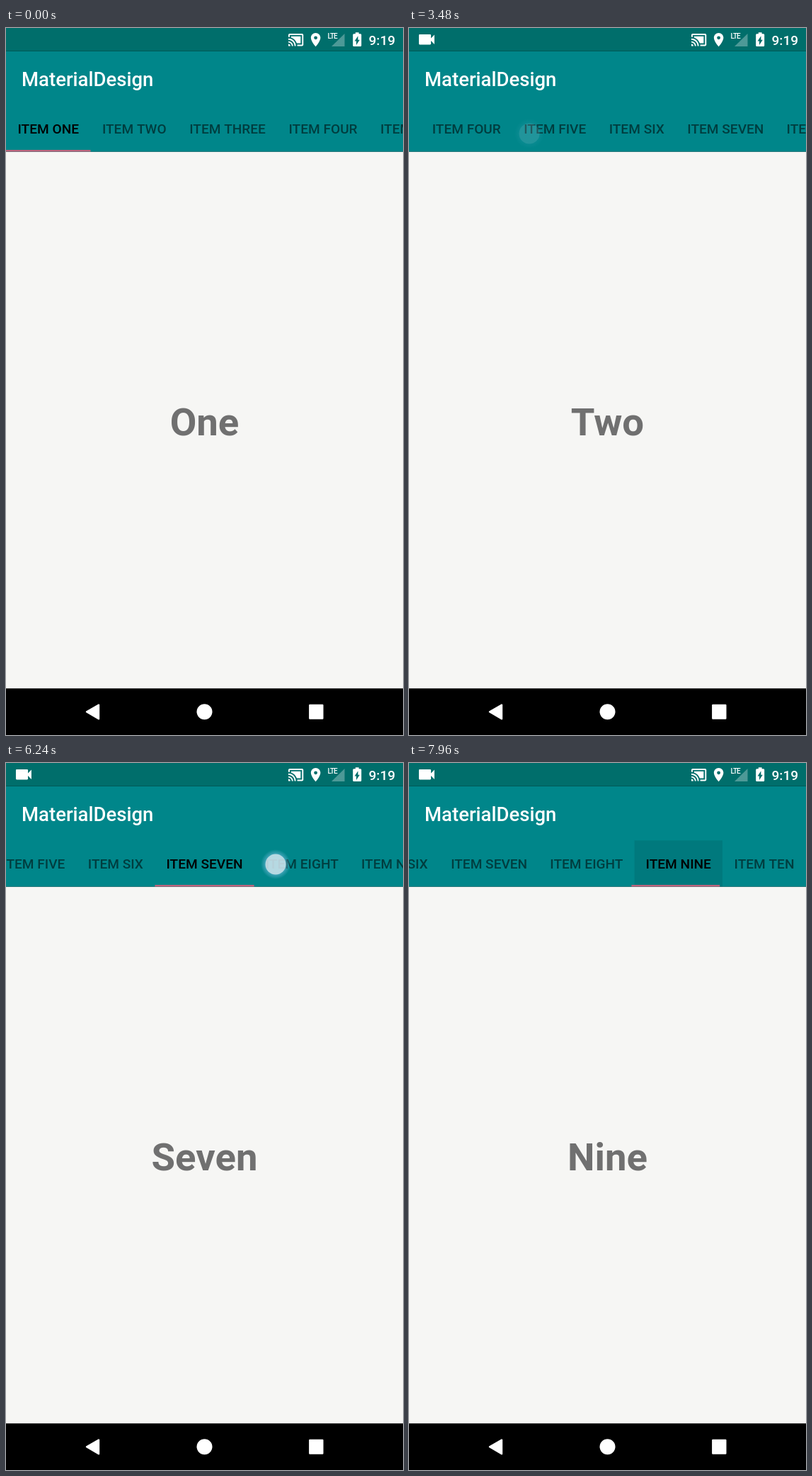
These frames come from a looping animation (561 px wide and 998 px high, 8 s). An HTML page with a canvas:

```html
<!DOCTYPE html>
<html lang="en">
<head>
<meta charset="utf-8">
<title>Scrolling tabs</title>
<style>
  html, body { margin: 0; width: 100%; height: 100%; overflow: hidden; background: #000; }
  canvas { display: block; width: 561px; height: 998px; }
</style>
</head>
<body>
<canvas id="stage"></canvas>
<script>
const W = 561, H = 998, LOOP = 8000, STEP = 40;
const BAR = { status: 32.7, tabs: 109.2, page: 174.6, nav: 932.5 };
const TEAL = '#00868a';
const FONT = 'Roboto, sans-serif';

const names = ['One', 'Two', 'Three', 'Four', 'Five', 'Six', 'Seven', 'Eight', 'Nine', 'Ten'];
// Left edge of every tab, plus the end of the strip
const edges = [0, 119.5, 243, 383, 513, 633, 744, 884.3, 1019.5, 1144, 1262];
const maxScroll = edges[10] - W;

const taps = [
  { from: 0, to: 1, down: 1310, up: 1550, x: 184, y: 143 },
  { from: 1, to: 6, down: 4550, up: 4677.2, x: 330, y: 115 },
  { from: 6, to: 7, down: 6230, up: 6380, x: 381, y: 143 },
  { from: 7, to: 8, down: 7550, up: 7726, x: 385, y: 143.5 }
];
const flick = { down: 3150, up: 3310, x0: 411, x: 170, y: 149, drag: 230, fling: 242, time: 600 };
const FRAME_LAG = 17;

const icons = {
  cast: new Path2D('M1 18v3h3c0-1.66-1.34-3-3-3zm0-4v2c2.76 0 5 2.24 5 5h2c0-3.87-3.13-7-7-7zm18-7H5v1.63c3.96 1.28 7.09 4.41 8.37 8.37H19V7zM1 10v2c4.97 0 9 4.03 9 9h2c0-6.08-4.93-11-11-11zm20-7H3c-1.1 0-2 .9-2 2v3h2V5h18v14h-7v2h7c1.1 0 2-.9 2-2V5c0-1.1-.9-2-2-2z'),
  pin: new Path2D('M12 2C8.13 2 5 5.13 5 9c0 5.25 7 13 7 13s7-7.75 7-13c0-3.87-3.13-7-7-7zm0 9.5a2.5 2.5 0 0 1 0-5 2.5 2.5 0 0 1 0 5z'),
  battery: new Path2D('M15.67 4H14V2h-4v2H8.33C7.6 4 7 4.6 7 5.33v15.33C7 21.4 7.6 22 8.33 22h7.33c.74 0 1.34-.6 1.34-1.33V5.33C17 4.6 16.4 4 15.67 4zM11 20v-5.5H9L13 7v5.5h2L11 20z'),
  camera: new Path2D('M17 10.5V7c0-.55-.45-1-1-1H4c-.55 0-1 .45-1 1v10c0 .55.45 1 1 1h12c.55 0 1-.45 1-1v-3.5l4 4v-11l-4 4z')
};

const canvas = document.getElementById('stage');
const ctx = canvas.getContext('2d');
const ratio = window.devicePixelRatio || 1;
canvas.width = W * ratio;
canvas.height = H * ratio;

const clamp = (v, lo = 0, hi = 1) => Math.min(hi, Math.max(lo, v));
const mix = (a, b, p) => a + (b - a) * p;
const quintOut = u => 1 - Math.pow(1 - u, 5);

// cubic-bezier(.4, 0, .2, 1)
function fastOutSlowIn(x) {
  let lo = 0, hi = 1, s = x;
  for (let i = 0; i < 24; i++) {
    s = (lo + hi) / 2;
    const bx = 1.2 * (1 - s) * (1 - s) * s + 0.6 * (1 - s) * s * s + s * s * s;
    if (bx < x) lo = s; else hi = s;
  }
  return x >= 1 ? 1 : 3 * (1 - s) * s * s + s * s * s;
}

const lastTap = t => taps.filter(tap => tap.up <= t).pop();

function pageAt(t) {
  const tap = lastTap(t);
  if (!tap) return 0;
  const time = Math.min(600, (tap.to - tap.from + 1) * 100);
  return mix(tap.from, tap.to, quintOut(clamp((t - tap.up) / time)));
}

function scrollAt(t) {
  const late = t - FRAME_LAG;
  if (t > flick.down && late < taps[1].up) {
    const drag = flick.drag * clamp((t - flick.down) / (flick.up - flick.down));
    const u = clamp((t - flick.up) / flick.time);
    return drag + flick.fling * (1 - Math.pow(1 - u, 2.5));
  }
  const page = pageAt(late), i = Math.floor(page);
  const center = k => (edges[k] + edges[k + 1]) / 2;
  return clamp(mix(center(i), center(i + 1), page - i) - W / 2, 0, maxScroll);
}

function indicatorAt(t) {
  const tap = lastTap(t);
  if (!tap) return [edges[0], edges[1]];
  const left = edges[tap.to], right = edges[tap.to + 1];
  const near = tap.to - tap.from === 1;
  const start = near ? [edges[tap.from], edges[tap.from + 1]] : [left - 32.7, left - 32.7];
  const p = fastOutSlowIn(clamp((t - tap.up) / 300));
  return [mix(start[0], left, p), mix(start[1], right, p)];
}

function rect(x, y, w, h, color) {
  ctx.fillStyle = color;
  ctx.fillRect(x, y, w, h);
}

function circle(x, y, r, color) {
  ctx.fillStyle = color;
  ctx.beginPath();
  ctx.arc(x, y, r, 0, Math.PI * 2);
  ctx.fill();
}

function text(str, x, y, size, weight, color, align = 'left') {
  ctx.font = `${weight} ${size}px ${FONT}`;
  ctx.textAlign = align;
  ctx.fillStyle = color;
  ctx.fillText(str, x, y);
}

function icon(path, x, y, sx, sy = sx, alpha = 1) {
  ctx.save();
  ctx.translate(x, y);
  ctx.scale(sx, sy);
  ctx.fillStyle = `rgba(255,255,255,${alpha})`;
  ctx.fill(path, 'evenodd');
  ctx.restore();
}

function polygon(points, color, round = 0) {
  ctx.beginPath();
  points.forEach(([x, y]) => ctx.lineTo(x, y));
  ctx.closePath();
  ctx.fillStyle = ctx.strokeStyle = color;
  ctx.fill();
  if (round) {
    ctx.lineWidth = round;
    ctx.lineJoin = 'round';
    ctx.stroke();
  }
}

function drawStatus(t) {
  rect(0, 0, W, BAR.status, '#006e6b');
  icon(icons.camera, 10.3, 1.6, 1.22, 1.22, clamp((t - 80) / 160));
  icon(icons.cast, 398, 5.1, 0.967);
  icon(icons.pin, 426, 5.1, 0.967);
  polygon([[478.5, 8], [478.5, 26], [460, 26]], 'rgba(255,255,255,.3)');
  ctx.letterSpacing = '-1px';
  text('LTE', 454.5, 15.2, 10, '500 condensed', '#fff');
  ctx.letterSpacing = '0px';
  icon(icons.battery, 481.8, 4.4, 1.2, 0.98);
  text('9:19', 512.5, 23.7, 19.1, 500, '#fff');
}

function drawRipple(t, scroll) {
  const tap = lastTap(t);
  if (!tap) return;
  const age = t - tap.up;
  const alpha = 0.1 * (1 - clamp((age - 220) / 380));
  if (alpha <= 0) return;
  const left = edges[tap.to] - scroll, width = edges[tap.to + 1] - edges[tap.to];
  ctx.save();
  ctx.beginPath();
  ctx.rect(left, BAR.tabs, width, BAR.page - BAR.tabs);
  ctx.clip();
  circle(clamp(tap.x, left, left + width), tap.y, mix(20, 165, clamp(age / 200)), `rgba(0,0,0,${alpha})`);
  ctx.restore();
}

function drawTabs(t) {
  const scroll = scrollAt(t);
  const tap = lastTap(t), selected = tap ? tap.to : 0;
  rect(0, BAR.status, W, BAR.page - BAR.status, TEAL);
  text('MaterialDesign', 22, 81.6, 27.5, 500, '#fff');
  drawRipple(t, scroll);
  names.forEach((name, i) => {
    const middle = (edges[i] + edges[i + 1]) / 2 - scroll;
    const color = i === selected ? '#000' : 'rgba(0,0,0,.54)';
    text('ITEM ' + name.toUpperCase(), middle, 149.4, 19.1, 500, color, 'center');
  });
  const [left, right] = indicatorAt(t);
  rect(left - scroll, BAR.page - 2.6, right - left, 2.6, '#bb657d');
}

function drawPages(t) {
  rect(0, BAR.page, W, BAR.nav - BAR.page, '#f6f6f4');
  const page = pageAt(t), tap = lastTap(t);
  const first = !tap ? 0 : tap.to - 1;
  names.forEach((name, i) => {
    if (i < first || Math.abs(i - page) >= 1) return;
    text(name, W / 2 + (i - page) * W, 574.8, 54.5, 700, '#707070', 'center');
  });
}

function drawNav() {
  rect(0, BAR.nav, W, H - BAR.nav, '#000');
  polygon([[114, 965.3], [131, 955.5], [131, 975.2]], '#fff', 2.4);
  circle(280.5, 965.2, 11, '#fff');
  polygon([[429.3, 956], [447.3, 956], [447.3, 974.6], [429.3, 974.6]], '#fff', 2.4);
}

function drawTouch(t) {
  [flick, ...taps].forEach(touch => {
    if (t < touch.down) return;
    const alpha = 1 - clamp((t - touch.up) / 200);
    if (alpha <= 0) return;
    const p = clamp((t - touch.down) / (touch.up - touch.down));
    const x = touch.x0 ? mix(touch.x0, touch.x, p) : touch.x;
    const glow = ctx.createRadialGradient(x, touch.y, 14, x, touch.y, 21);
    glow.addColorStop(0, `rgba(110,185,215,${0.6 * alpha})`);
    glow.addColorStop(1, 'rgba(110,185,215,0)');
    circle(x, touch.y, 21, glow);
    circle(x, touch.y, 14.5, `rgba(232,240,244,${0.7 * alpha})`);
  });
}

function draw(t) {
  ctx.setTransform(ratio, 0, 0, ratio, 0, 0);
  rect(0, 0, W, H, '#000');
  drawPages(t);
  drawTabs(t);
  drawStatus(t);
  drawNav();
  drawTouch(t);
}

const begin = performance.now();
function tick() {
  const t = (performance.now() - begin) % LOOP;
  draw(Math.floor(t / STEP) * STEP);
  requestAnimationFrame(tick);
}
tick();
</script>
</body>
</html>
```
